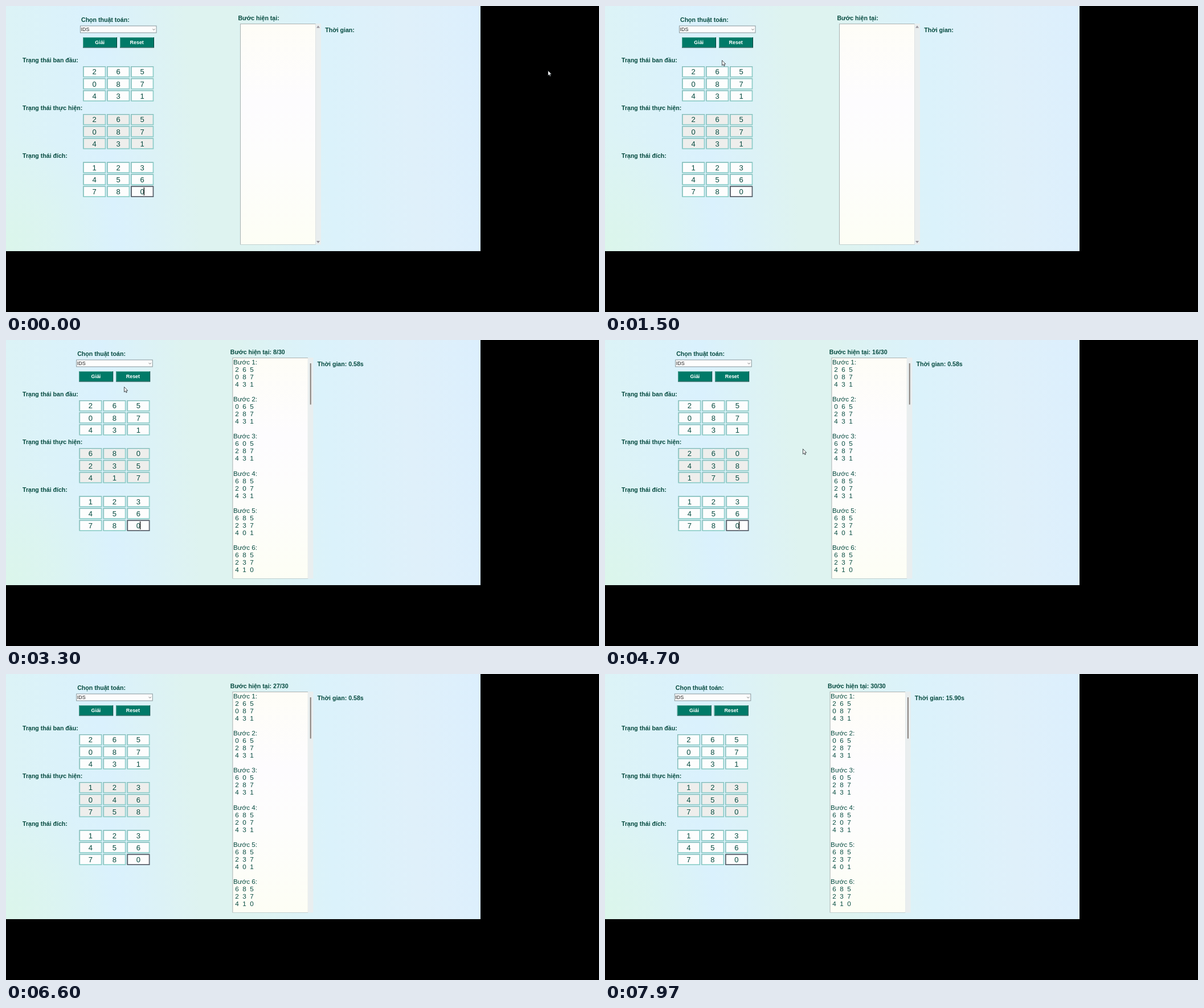
Write an HTML page with a canvas that moves like this. It is 1041 by 538 pixels and loops after 8000 ms.

```html
<!DOCTYPE html>
<html lang="vi">
<head>
<meta charset="utf-8">
<title>8-puzzle IDS</title>
<style>
  html, body { margin: 0; width: 100%; height: 100%; overflow: hidden; background: #000; }
  canvas { display: block; }
</style>
</head>
<body>
<canvas id="stage" width="1041" height="538"></canvas>
<script>
const ctx = document.getElementById('stage').getContext('2d');
const LOOP = 8000, SOLVED = 2045, STEP_MS = 170, DONE = SOLVED + 30 * STEP_MS;
const SANS = '"Liberation Sans", Arial, sans-serif';
const INK = '#064b40';
const START = '265087431', GOAL = '123456780';

// Positions of the blank tile from the first step to the last.
const BLANK_PATH = '301478521036785214367852103478';

const MOUSE = [
  [0, 951, 113], [620, 951, 113], [830, 889, 112], [1400, 205, 95], [1550, 205, 95],
  [1750, 164, 64], [1980, 164, 64], [2500, 207, 82], [4250, 207, 82],
  [4700, 345, 190], [5000, 932, 516], [5050, 990, 550]
];

function solve() {
  const states = [START];
  for (let i = 1; i < BLANK_PATH.length; i++) {
    const tiles = [...states[i - 1]];
    const from = BLANK_PATH[i - 1], to = BLANK_PATH[i];
    [tiles[from], tiles[to]] = [tiles[to], tiles[from]];
    states.push(tiles.join(''));
  }
  return states;
}
const STATES = solve();

function rect(x, y, w, h, fill) {
  ctx.fillStyle = fill;
  ctx.fillRect(x, y, w, h);
}

function text(str, x, y, size, { bold = false, color = INK, align = 'left' } = {}) {
  ctx.font = `${bold ? 'bold ' : ''}${size}px ${SANS}`;
  ctx.textAlign = align;
  ctx.fillStyle = color;
  ctx.fillText(str, x, y);
}

const label = (str, x, y) => text(str, x, y, 10.6, { bold: true });

function gradient(x0, y0, x1, y1, colors) {
  const g = ctx.createLinearGradient(x0, y0, x1, y1);
  colors.forEach(([at, color]) => g.addColorStop(at, color));
  return g;
}

function background() {
  rect(0, 0, 1041, 538, '#000');
  rect(0, 0, 833, 431, gradient(0, 60, 833, 0, [
    [0, '#dcf3f6'], [0.2, '#daf1fd'], [0.38, '#def3f0'], [0.48, '#def3f0'],
    [0.66, '#dbf2fb'], [0.84, '#dff0fa'], [1, '#dceffd']
  ]));
  const glow = ctx.createRadialGradient(0, 420, 0, 0, 420, 200);
  glow.addColorStop(0, 'rgba(219,246,234,.9)');
  glow.addColorStop(1, 'rgba(219,246,234,0)');
  rect(0, 220, 200, 211, glow);
}

function button(str, x) {
  rect(x, 55, 60, 18.5, '#033f38');
  rect(x, 55, 59, 17.5, '#4fa596');
  rect(x + 1, 56, 58, 16, '#007a68');
  text(str, x + 29.7, 67.2, 8.9, { bold: true, color: '#fff', align: 'center' });
}

function comboBox(x) {
  rect(x, 34.5, 134.5, 13, '#87969b');
  rect(x + 1, 35.5, 132.5, 11, '#fdfdfd');
  text('IDS', x + 1.5, 44.3, 9, { color: '#222' });
  ctx.strokeStyle = '#888';
  ctx.lineWidth = 1;
  ctx.beginPath();
  ctx.moveTo(x + 127.5, 40);
  ctx.lineTo(x + 129.5, 42.5);
  ctx.lineTo(x + 131.5, 40);
  ctx.stroke();
}

function board(tiles, x0, y0, fill, activeIndex = -1) {
  [...tiles].forEach((tile, i) => {
    const x = x0 + (i % 3) * 42, y = y0 + Math.floor(i / 3) * 21.1;
    const active = i === activeIndex;
    rect(x, y, 40, 19.5, active ? '#4b5860' : '#86cbc0');
    rect(x, y, 39, 18.5, active ? '#4b5860' : '#84b7b3');
    rect(x + 1, y + 1, 38, 17.5, active ? '#777783' : '#a5d9dc');
    rect(x + 1.7, y + 1.7, 36.5, 16, fill);
    text(tile, x + 19.8, y + 14.4, 13, { align: 'center' });
  });
}

function arrow(x, y, dir) {
  ctx.fillStyle = '#98939b';
  ctx.beginPath();
  ctx.moveTo(x - 3, y + 2 * dir);
  ctx.lineTo(x + 3, y + 2 * dir);
  ctx.lineTo(x, y - 2 * dir);
  ctx.fill();
}

function stepList(x, filled) {
  rect(x, 31, 133, 388.5, '#a9b1b1');
  rect(x + 1, 32, 131.5, 387, gradient(0, 32, 0, 419, [
    [0, '#fefdf7'], [0.35, '#fdfcfe'], [0.6, '#fdfdfc'], [1, '#fdfef5']
  ]));
  rect(x + 132.5, 31, 9.5, 388.5, '#e9eeef');
  if (!filled) {
    arrow(x + 137, 36.5, 1);
    arrow(x + 137, 415, -1);
    return;
  }
  rect(x + 136.3, 41, 2, 72.5, '#88807c');
  ctx.save();
  ctx.beginPath();
  ctx.rect(x, 32, 132, 387);
  ctx.clip();
  for (let n = 0; n < 6; n++) {
    const y = 43.2 + n * 65.1;
    text(`Bước ${n + 1}:`, x + 1.5, y, 11.7);
    for (let row = 0; row < 3; row++) {
      const line = [...STATES[n].slice(row * 3, row * 3 + 3)].join('  ');
      text(' ' + line, x + 1.5, y + 13.02 * (row + 1), 11.7);
    }
  }
  ctx.restore();
}

function caretVisible(t) {
  const origin = t < SOLVED ? 0 : t < DONE ? SOLVED + 22 : DONE;
  return (t - origin + 306) % 306 < 204;
}

function mousePointer(t) {
  const next = MOUSE.findIndex(p => p[0] > t);
  if (next < 0) return;
  const [t0, x0, y0] = MOUSE[next - 1], [t1, x1, y1] = MOUSE[next];
  const k = (t - t0) / (t1 - t0);
  ctx.save();
  ctx.translate(x0 + (x1 - x0) * k, y0 + (y1 - y0) * k);
  ctx.beginPath();
  [[0.5, 0.5], [0.5, 9.5], [2.6, 7.7], [4, 10.7], [5.3, 10], [4, 7.1], [6.7, 7]]
    .forEach(([x, y]) => ctx.lineTo(x, y));
  ctx.closePath();
  ctx.fillStyle = '#fff';
  ctx.fill();
  ctx.strokeStyle = '#1c2226';
  ctx.lineWidth = 0.8;
  ctx.stroke();
  ctx.restore();
}

function draw(t) {
  const solved = t >= SOLVED, done = t >= DONE;
  const step = solved ? Math.min(30, Math.floor((t - SOLVED) / STEP_MS) + 1) : 0;
  // The centred columns slide left as the time label grows.
  const shift = done ? -16.4 : solved ? -13.6 : 0;
  const half = shift / 2;

  background();
  label('Chọn thuật toán:', 132 + half, 27.7);
  comboBox(130 + half);
  button('Giải', 135 + half);
  button('Reset', 200 + half);

  label('Trạng thái ban đầu:', 29, 98.5);
  board(START, 135.3 + half, 106, '#fdfdfd');
  label('Trạng thái thực hiện:', 29, 182.6);
  board(STATES[Math.max(0, step - 1)], 135.3 + half, 190, '#eeeeec');
  label('Trạng thái đích:', 29, 266.7);
  board(GOAL, 135.3 + half, 274.3, '#fdfdfd', 8);
  if (caretVisible(t)) rect(241.7 + half, 319, 1.3, 14, '#111');

  label('Bước hiện tại:' + (solved ? ` ${step}/30` : ''), 407.4 + shift, 25);
  stepList(411 + shift, solved);
  label('Thời gian:' + (done ? ' 15.90s' : solved ? ' 0.58s' : ''), 560.2 + shift, 45.7);
  mousePointer(t);
}

const began = performance.now();
function tick() {
  draw((performance.now() - began) % LOOP);
  requestAnimationFrame(tick);
}
tick();
</script>
</body>
</html>
```
